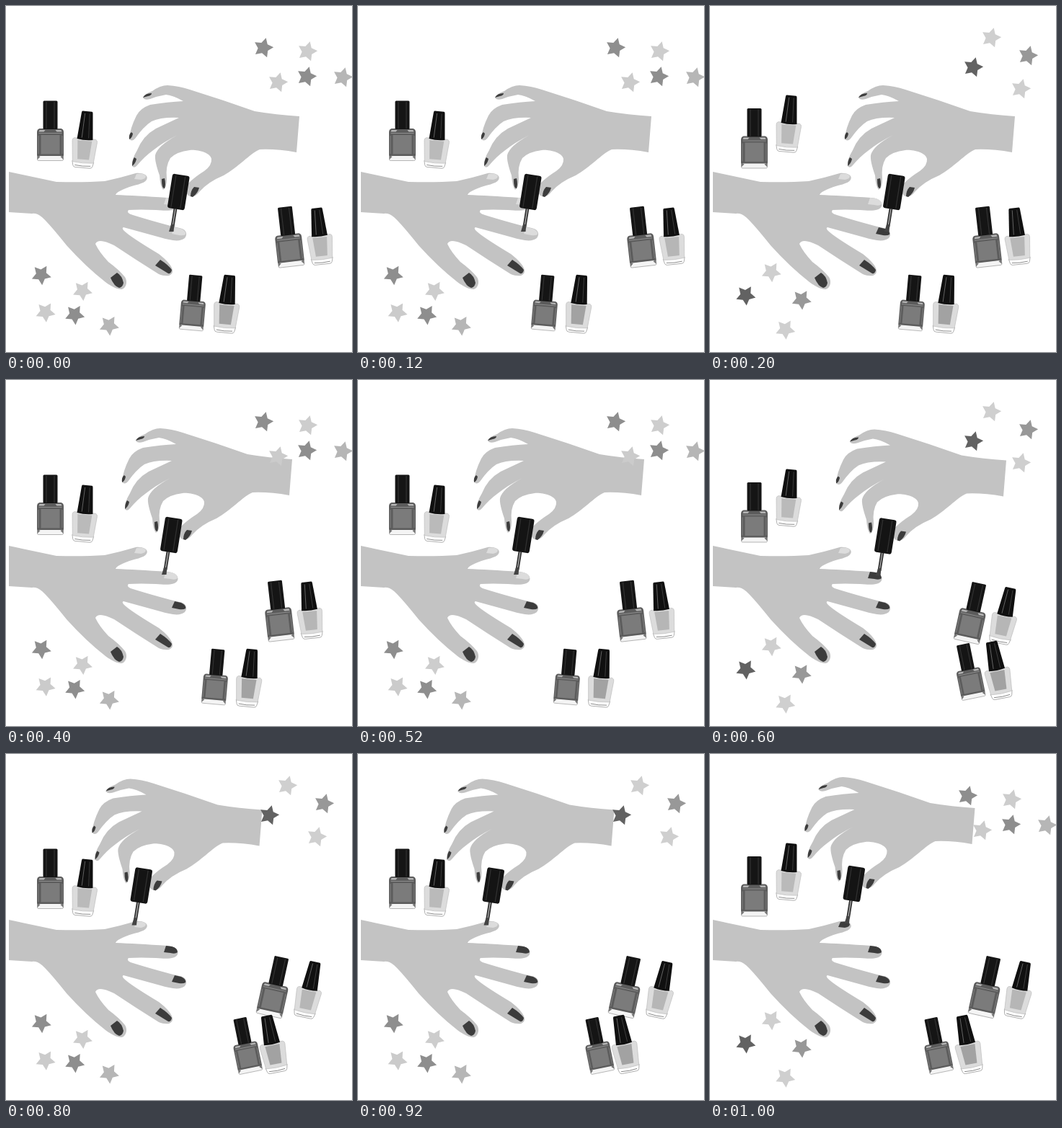
An HTML page for the animation above (1200 ms loop, 480 by 480 pixels).

```html
<!DOCTYPE html>
<html lang="en">
<head>
<meta charset="utf-8">
<title>Manicure</title>
<style>
html, body { margin: 0; width: 100%; height: 100%; overflow: hidden; background: #fff; }
svg { display: block; width: 100%; height: 100%; }
</style>
</head>
<body>
<svg viewBox="0 0 480 480">
  <defs>
    <g id="dark">
      <path d="M-18 34V40Q-18 41.500-16 41.500H16Q18 41.500 18 40V34Z" fill="#f4f4f4" stroke="#999" stroke-width=".7"/>
      <path d="M-18 34V40L-14 36ZM18 34V40L14 36Z" fill="#777"/>
      <path d="M-15 -3H15Q18.500 -2 18.500 2V34Q18.500 35 17 35H-17Q-18.500 35-18.500 34V2Q-18.500 -2-15 -3Z" fill="#5c5c5c"/>
      <path d="M-15 -1H-7L-9 1.500H-16ZM15 -1H7L9 1.500H16Z" fill="#b5b5b5"/>
      <path d="M-16 3.500H16" stroke="#909090"/>
      <path d="M-16.500 7V32M16.500 7V32" stroke="#808080"/>
      <rect x="-13" y="6" width="26" height="26.500" fill="#7b7b7b"/>
      <rect x="-10" y="-41.500" width="20" height="39.500" rx="1.500" fill="#151515"/>
      <path d="M-5.500 -40V-3M5.500 -40V-3" stroke="#333" stroke-width="1.200"/>
    </g>
    <g id="light">
      <path d="M-15 31H15L13.500 37Q13 39.500 10 39.500H-10Q-13 39.500-13.500 37Z" fill="#fff" stroke="#a0a0a0" stroke-width=".8"/>
      <path d="M-11 36.500Q0 38 11 36.500" fill="none" stroke="#777" stroke-width=".8"/>
      <path d="M-15 -1H15Q17.500 0 17.300 3L14.500 32Q0 34-14.500 32L-17.300 3Q-17.500 0-15 -1Z" fill="#dcdcdc" stroke="#c0c0c0" stroke-width=".7"/>
      <path d="M-10 2H10L8 28H-8Z" fill="currentColor"/>
      <path d="M-6.500 -39H6.500Q7.500 -39 7.800 -37L11 0Q0 2-11 0L-7.800 -37Q-7.500 -39-6.500 -39Z" fill="#101010"/>
      <path d="M-3 -36L-4.500 -2" stroke="#666" stroke-width=".9"/>
      <path d="M3.500 -36L5 -2" stroke="#3f3f3f" stroke-width=".9"/>
    </g>
  </defs>

  <g id="bottles"></g>

  <path fill="#c3c3c3" d="M4 230L70 244Q108 245 137 243Q160 238 180 232C192 231 198 236 195 241C192 247 178 248 166 253Q153 258 152 262Q180 263 224 266C236 267 240 273 238 278C235 285 222 284 208 283Q186 282 170 283Q166 287 176 290Q215 302 241 308C251 310 252 317 248 322C241 328 228 325 214 321Q185 313 163 307Q160 308 164 312Q172 320 212 344C225 354 232 363 231 369C229 376 220 375 212 372Q180 352 150 332Q128 321 124 330Q129 341 142 355Q157 366 165 376C170 384 165 393 160 393C154 393 146 389 138 383Q111 362 84 332Q60 302 50 293Q43 287 36 288L4 286Z"/>
  <g fill="#3c3c3c">
    <path d="M145 377L154 370Q161 374 163 384Q162 390 157 391Q150 389 145 377Z"/>
    <path d="M207 360L214 352Q225 359 230 366Q229 372 225 371Z"/>
  </g>
  <path class="nail" d="M230 316L234 307L243 309Q250 312 249 317Q246 319 240 318Z"/>
  <path class="nail" d="M219 275L222 266L230 267Q238 269 238 275Q235 278 228 276Z"/>
  <path class="nail" d="M178 240L181 233Q191 231 194 236Q194 240 187 241Z"/>

  <g id="painter">
    <path fill="#c3c3c3" d="M407 153L403 203Q375 198 352 199C338 205 322 224 302 235Q280 244 268 258C262 267 252 266 250 258Q249 250 253 246Q262 237 275 229Q286 221 285 212C283 203 265 199 255 200Q237 202 228 211Q221 222 223 240Q223 252 218 255Q214 250 213 235Q206 215 207 207Q210 194 238 179Q218 189 203 201Q192 209 182 221Q178 226 175 222Q174 213 182 200Q190 180 208 170Q225 162 240 155Q215 154 202 160Q191 167 179 184Q174 189 171 184Q172 170 181 152Q186 142 200 137Q225 133 246 132Q232 124 222 123Q210 125 200 129Q192 131 190 127Q192 122 203 118Q214 110 224 110Q240 111 255 116Q300 130 345 146Q375 151 407 153Z"/>
    <g fill="#3c3c3c">
      <path d="M190 127Q193 121 202 121Q202 124 197 125Z"/>
      <path d="M171 185Q170 178 174 175L176 177Q175 183 171 185Z"/>
      <path d="M175 222Q175 214 178 210L181 212Q180 218 175 222Z"/>
      <path d="M216 240L220 239Q222 247 220 253Q216 254 216 240Z"/>
      <path d="M256 264Q256 256 261 251L268 252Q266 260 259 265Z"/>
    </g>
    <path d="M235 281L231 306" stroke="#333" stroke-width="4.800"/>
    <path d="M235 281L231.500 303" stroke="#b0b0b0" stroke-width="1.300"/>
    <path d="M229 303H233.500L232.500 313H226Z" fill="#444"/>
    <g transform="translate(239.300 258) rotate(9)">
      <rect x="-12" y="-24" width="24" height="48" rx="3" fill="#141414"/>
      <path d="M-7 -22V22M6 -22V22" stroke="#303030" stroke-width="1.300"/>
    </g>
  </g>

  <g id="stars"></g>
</svg>
<script>
const NS = "http://www.w3.org/2000/svg";
const STEP = 200, STEPS = 6;
const $ = id => document.getElementById(id);

function add(parent, tag, attrs) {
  const el = document.createElementNS(NS, tag);
  for (const key in attrs) el.setAttribute(key, attrs[key]);
  return parent.appendChild(el);
}

// A pose is x, y, rotation; a trail repeats it with horizontal shifts.
const trail = (x, y, turn, shifts) => shifts.map(d => [x + d, y, turn]);
const hop = (x, y, turn, dy) =>
  Array.from({ length: STEPS }, (_, i) => [x, y + (i % 2) * dy, turn]);

const bottles = [
  { kind: "dark", scale: 1, poses: hop(61.5, 173, 0, 10.5) },
  { kind: "light", scale: 1, fill: "#bababa", poses: hop(109.5, 185, 5, -22) },
  { kind: "dark", scale: 1, poses: [
    ...trail(391.5, 320, -6.5, [0, -9, -14]), ...trail(364.5, 322.5, 12.5, [0, 9, 20])] },
  { kind: "light", scale: 1, fill: "#b6b6b6", poses: [
    ...trail(435, 319, -6, [0, -9, -14]), ...trail(409, 326.5, 12, [0, 12, 20.5])] },
  { kind: "dark", scale: .92, poses: [
    ...trail(260, 411.5, 5, [0, 21, 31]), ...trail(358.5, 404, -11.5, [0, -26.5, -44.5])] },
  { kind: "light", scale: 1.02, fill: "#a2a2a2", poses: [
    ...trail(306.5, 413, 5.5, [0, 21, 31]), ...trail(398, 402, -11, [0, -29, -41])] }
];
for (const b of bottles) {
  b.el = add($("bottles"), "use", { href: "#" + b.kind, color: b.fill || "#000" });
}

function starPoints(x, y) {
  const points = [];
  for (let i = 0; i < 10; i++) {
    const r = i % 2 ? 7.4 : 14.2;
    const a = (i * 36 - 75) * Math.PI / 180;
    points.push((x + r * Math.cos(a)).toFixed(2) + "," + (y + r * Math.sin(a)).toFixed(2));
  }
  return points.join(" ");
}

// Star places are relative to the first star of each cluster.
const clusters = [
  [[0, 0, "#8e8e8e"], [61, 5, "#cdcdcd"], [20, 48, "#cbcbcb"], [60, 40, "#8e8e8e"],
    [110, 41, "#b6b6b6"]],
  [[0, 0, "#cfcfcf"], [51, 25, "#989898"], [-25, 41, "#626262"], [41, 71, "#cfcfcf"]]
];

function starGroup(cluster, x, y, turn) {
  const group = add($("stars"), "g", { transform: `translate(${x} ${y}) rotate(${turn})` });
  for (const [dx, dy, fill] of cluster) {
    add(group, "polygon", { points: starPoints(dx, dy), fill });
  }
  return group;
}

const upper = [starGroup(clusters[0], 357, 58, 0), starGroup(clusters[1], 390, 44, 0)];
const lower = [starGroup(clusters[0], 49, 373, 16.3), starGroup(clusters[1], 85, 369, 16.3)];
const upperOrder = [0, 1, 0, 1, 1, 0];
const strokes = [[0, 0], [16, 0], [-10, -43], [4, -41.5], [-51.5, -75.5], [-39.5, -78]];
const nails = document.querySelectorAll(".nail");

function showOnly(groups, active) {
  groups.forEach((g, i) => g.setAttribute("visibility", i === active ? "visible" : "hidden"));
}

function draw(time) {
  const step = Math.floor(time / STEP) % STEPS;
  for (const b of bottles) {
    const [x, y, turn] = b.poses[step];
    b.el.setAttribute("transform", `translate(${x} ${y}) rotate(${turn}) scale(${b.scale})`);
  }
  $("painter").setAttribute("transform", `translate(${strokes[step]})`);
  // Each nail turns dark on the second half of its brush stroke.
  nails.forEach((n, i) => n.setAttribute("fill", step > i * 2 ? "#3c3c3c" : "#dcdcdc"));
  showOnly(upper, upperOrder[step]);
  showOnly(lower, step % 2);
}

function tick() {
  draw(performance.now());
  requestAnimationFrame(tick);
}
draw(0);
requestAnimationFrame(tick);
</script>
</body>
</html>
```
